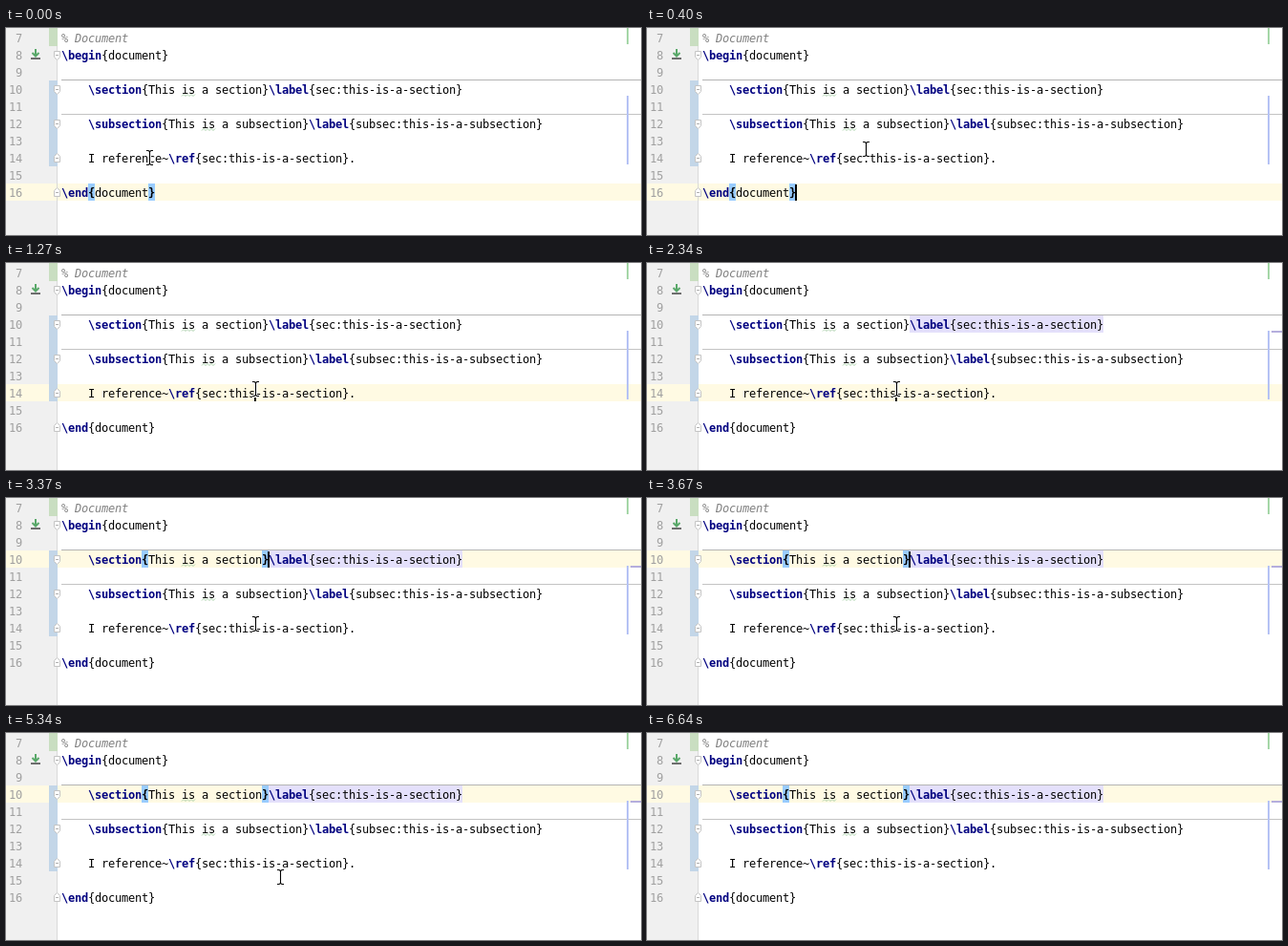
Write an HTML page that moves like this. It is 665x217 px and loops after 6.67 s.

```html
<!DOCTYPE html>
<html lang="en">
<head>
<meta charset="utf-8">
<title>Editor: go to label</title>
<style>
  html, body { margin: 0; width: 100%; height: 100%; overflow: hidden; background: #fff; }
  svg { display: block; }
  text { font: 12px "DejaVu Sans Mono", monospace; fill: #000; }
  .command { font-weight: bold; fill: #000080; }
  .comment { font-style: italic; fill: #808080; }
  .number { fill: #a0a0a0; }
  .brace { font-weight: bold; }
</style>
</head>
<body>
<svg id="stage" width="665" height="217" viewBox="0 0 665 217"></svg>
<script>
const LOOP = 6670, CHAR = 7, ROW = 18, BLINK = 630;
const CLICK = 1080, USAGES = 1560, JUMP = 3340, LEAVE = 5400;

const source = {
  7: '% Document',
  8: String.raw`\begin{document}`,
  10: String.raw`\section{This is a section}\label{sec:this-is-a-section}`,
  12: String.raw`\subsection{This is a subsection}\label{subsec:this-is-a-subsection}`,
  14: String.raw`I reference~\ref{sec:this-is-a-section}.`,
  16: String.raw`\end{document}`
};

const rowTop = row => 55 + ROW * (row - 10);
const rect = (x, y, w, h, fill) =>
  `<rect x="${x}" y="${y}" width="${w}" height="${h}" fill="${fill}"/>`;

// Every character sits on the fixed editor grid.
function text(x, row, string, style = '') {
  const xs = [...string].map((_, i) => x + i * CHAR).join(' ');
  const body = string.replace(/\\\w+/g, '<tspan class="command">$&</tspan>');
  return `<text class="${style}" x="${xs}" y="${rowTop(row) + 14}">${body}</text>`;
}

function fold(row, dir) {
  const y = rowTop(row) + 9.5;
  return `<path transform="translate(53.5 ${y}) scale(1 ${dir})" d="M-3-4H3V2L0 5L-3 2Z" fill="#fff" stroke="#c4c4c4"/>
    <path d="M52 ${y}h3" stroke="#b0b0b0"/>`;
}

const wave = (x, row) =>
  `<path d="M${x} ${rowTop(row) + 16.5}${'l2-2l2 2'.repeat(3)}l2-2" fill="none" stroke="#a3cfa3" stroke-width=".9"/>`;

const braces = (row, columns) => columns.map(([x, c]) =>
  rect(x, rowTop(row), CHAR, ROW, '#99ccff') + text(x, row, c, 'brace')).join('');

let numbers = '', code = '';
for (let row = 7; row <= 16; row++) {
  numbers += text(row < 10 ? 10 : 3, row, String(row), 'number');
  if (source[row]) {
    const indent = row >= 10 && row <= 14 ? 86 : 58;
    code += text(indent, row, source[row], row === 7 ? 'comment' : '');
  }
}

const stage = document.getElementById('stage');
const beam = 'M-3-7.5H-1L.5-6.5L2-7.5H4M.5-6.5V6.5M-3 7.5H-1L.5 6.5L2 7.5H4';
stage.innerHTML = `
  ${rect(0, 0, 53, 217, '#f0f0f0')}
  <g id="line">${rect(0, 0, 665, ROW, '#fffae3')}</g>
  ${rect(53, 0, 1, 217, '#d9d9d9')}
  ${rect(45, 0, 9, 19, '#c9dec1')}
  ${rect(45, 55, 9, 90, '#c3d6e8')}
  <g id="usages">
    ${rect(275, 55, 203, ROW, '#e4e0fb')}
    ${rect(654, 71, 11, 2, '#b5aedd')}
  </g>
  ${rect(58, 54, 607, 1, '#b4b4b4')}
  ${rect(58, 90, 607, 1, '#c4c4c4')}
  ${rect(650, 0, 2, 17, '#a5d6a7')}
  ${rect(650, 71, 2, 72, '#b5c2f4')}
  ${numbers}
  <path d="M31 22v6M27.5 26L31 29.5L34.5 26" fill="none" stroke="#59a869" stroke-width="2"/>
  ${rect(26, 31, 10, 2, '#6e6e6e')}
  ${fold(8, 1)}${fold(10, 1)}${fold(12, 1)}${fold(14, -1)}${fold(16, -1)}
  ${code}
  ${wave(184, 10)}${wave(205, 12)}
  <g id="endBraces">${braces(16, [[86, '{'], [149, '}']])}</g>
  <g id="sectionBraces">${braces(10, [[142, '{'], [268, '}']])}</g>
  <g id="caret">${rect(-1, 0, 2, ROW - 1, '#000')}</g>
  <g id="mouse" fill="none">
    <path d="${beam}" stroke="#fff" stroke-width="3"/>
    <path d="${beam}" stroke="#000" stroke-width="1.1"/>
  </g>`;

const part = Object.fromEntries([...stage.querySelectorAll('[id]')].map(e => [e.id, e]));
const show = (e, on) => e.setAttribute('visibility', on ? 'visible' : 'hidden');
const move = (e, x, y) => e.setAttribute('transform', `translate(${x} ${y})`);

// Start time, row and x of each caret stop.
const stops = [[-CLICK, 16, 156], [CLICK, 14, 261], [JUMP, 10, 275]];

// Time, x and y along the pointer's path.
const path = [[0, 150, 136], [620, 261, 124], [800, 261, 132],
  [5240, 261, 132], [5340, 287, 149], [5370, 300, 194], [LEAVE, 300, 194]];

function pointer(t) {
  const i = path.findIndex(p => t < p[0]);
  const [t0, x0, y0] = path[i - 1], [t1, x1, y1] = path[i];
  let k = (t - t0) / (t1 - t0);
  if (t < 800) k = k * k * (3 - 2 * k);
  return [x0 + (x1 - x0) * k, y0 + (y1 - y0) * k].map(Math.round);
}

function draw(now) {
  const t = now % LOOP;
  const [start, row, x] = stops.filter(s => t >= s[0]).pop();
  move(part.line, 0, rowTop(row));
  move(part.caret, x, rowTop(row) + 1);
  show(part.caret, (t - start) % (2 * BLINK) < BLINK);
  show(part.usages, t >= USAGES);
  show(part.endBraces, t < CLICK);
  show(part.sectionBraces, t >= JUMP);
  show(part.mouse, t < LEAVE);
  if (t < LEAVE) move(part.mouse, ...pointer(t));
}

const began = performance.now();
function tick() {
  draw(performance.now() - began);
  requestAnimationFrame(tick);
}
tick();
</script>
</body>
</html>
```
